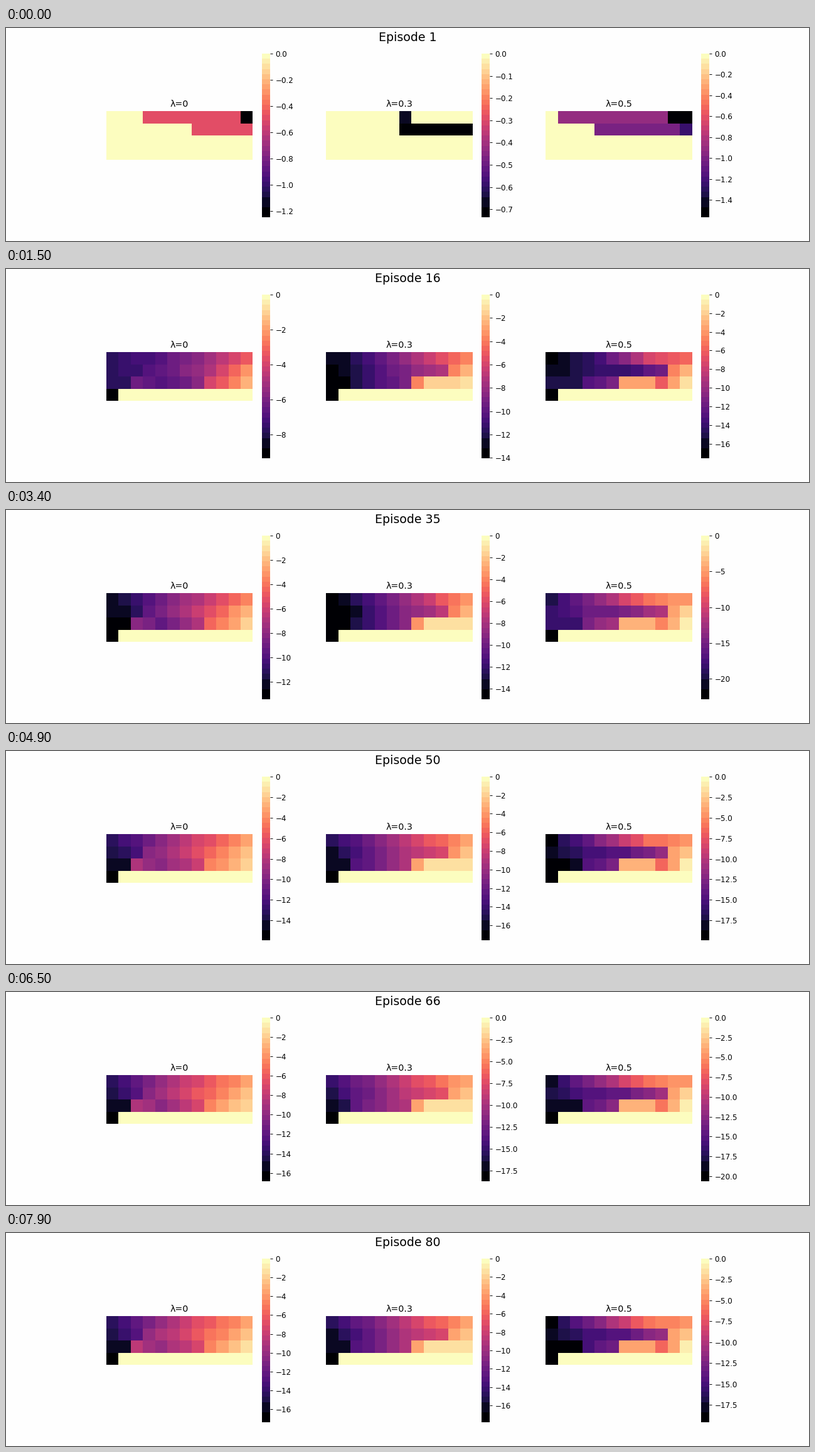
Animation of 1280 by 341 pixels, one loop 8000 ms. Source, as a matplotlib script:

```python
import numpy as np
import matplotlib.pyplot as plt
from matplotlib.animation import FuncAnimation
from matplotlib.colors import ListedColormap

ROWS, COLS, EPISODES = 4, 12, 80
WARMUP = 16  # episodes until the whole grid has been explored
ZOOM = 4 / 3  # default point sizes at the smaller dpi
LOW_TIMES = (16, 27, 35, 50, 66, 80)

plt.rcParams.update({
    "font.family": "DejaVu Sans",
    "font.size": 10 * ZOOM,
    "axes.titlesize": 12 * ZOOM,
    "axes.titlepad": 6 * ZOOM,
    "ytick.major.size": 3.5 * ZOOM,
    "ytick.major.width": 0.8 * ZOOM,
    "ytick.major.pad": 3.5 * ZOOM,
})


class Agent:
    """Cost-to-go grid of one learner on the cliff walk."""

    def __init__(self, label, speed, boost, lows, first, rows):
        self.label = label
        self.speed = speed  # how fast deep costs spread
        self.boost = boost  # early overestimate far from the cliff
        self.lows = lows    # cost of the start cell over time
        self.first = np.zeros((ROWS, COLS))
        for row, begin, end, cost in first:
            self.first[row, begin:end] = cost
        self.final = np.array([np.interp(range(COLS), list(k), list(k.values()))
                               for k in rows])

    def learned(self, episode):
        low = np.interp(episode, LOW_TIMES, self.lows)
        cap = self.speed * episode
        gain = 1 + self.boost * np.exp(-episode / 25) * np.array([[1], [0.5], [0]])
        cost = np.zeros((ROWS, COLS))
        cost[:3] = np.minimum(cap * np.tanh(self.final * gain / cap), low)
        cost[3, 0] = low
        return cost

    def values(self, episode):
        mix = min((episode - 1) / (WARMUP - 1), 1)
        cost = self.learned(max(episode, WARMUP))
        return -(self.first * (1 - mix) + cost * mix)


# Rows give the final cost at a few columns, linear in between
agents = [
    Agent("λ=0", 0.5, 0, (9.37, 13.86, 13.45, 15.96, 16.89, 17.41),
          [(0, 3, 11, 0.5), (0, 11, 12, 1.25), (1, 7, 12, 0.5)],
          [{0: 14.8, 5: 8.9, 11: 3.5},
           {0: 15.6, 2: 13.2, 3: 10.4, 11: 2.4},
           {0: 16.2, 1: 16.2, 2: 8.8, 4: 10.4, 7: 7.3, 8: 4.5, 11: 1.6}]),
    Agent("λ=0.3", 1.4, 0, (14.07, 16.99, 15.02, 17.63, 18.73, 17.85),
          [(0, 6, 7, 0.69), (1, 6, 12, 0.737)],
          [{0: 15, 7: 7.6, 11: 3.7},
           {0: 16, 2: 13.5, 6: 9.3, 9: 7.5, 10: 3.9, 11: 2.5},
           {0: 16.6, 1: 16, 2: 13.3, 6: 9.4, 7: 3.6, 8: 1.4, 11: 1.3}]),
    Agent("λ=0.5", 1.3, 0.7, (17.59, 20.73, 22.9, 19.95, 20.69, 19.61),
          [(0, 1, 10, 0.93), (0, 10, 12, 1.569), (1, 4, 11, 0.99), (1, 11, 12, 1.255)],
          [{0: 18.2, 1: 15.7, 8: 5.7, 11: 4.4},
           {0: 17.8, 3: 15, 6: 14.3, 9: 11, 10: 4, 11: 2.5},
           {0: 19.6, 2: 19, 3: 14.9, 5: 13, 6: 3.7, 8: 3.7, 9: 6.3, 10: 3.8, 11: 1.2}]),
]

# Banded magma whose darkest steps run together in pairs
bands = plt.get_cmap("magma")(np.linspace(0, 1, 32))
bands[1], bands[3] = bands[0], bands[2]
cmap = ListedColormap(bands)

fig, axes = plt.subplots(1, 3, figsize=(20, 5.328125), dpi=64, facecolor="#fefefe")
title = fig.suptitle("Episode 1", fontsize=16 * ZOOM, y=0.983)

meshes = []
for ax, agent in zip(axes, agents):
    grid = agent.values(1)
    mesh = ax.pcolormesh(grid, cmap=cmap, vmin=grid.min(), vmax=0)
    ax.set_aspect("equal")
    ax.invert_yaxis()
    ax.axis("off")
    ax.set_title(agent.label)
    fig.colorbar(mesh, ax=ax).outline.set_visible(False)
    meshes.append(mesh)


def update(frame):
    episode = frame + 1
    title.set_text(f"Episode {episode}")
    for agent, mesh in zip(agents, meshes):
        grid = agent.values(episode)
        mesh.set_array(grid)
        mesh.set_clim(grid.min(), 0)
    return [title, *meshes]


anim = FuncAnimation(fig, update, frames=EPISODES, interval=100,
                     repeat=True, cache_frame_data=False)
plt.show()
```
